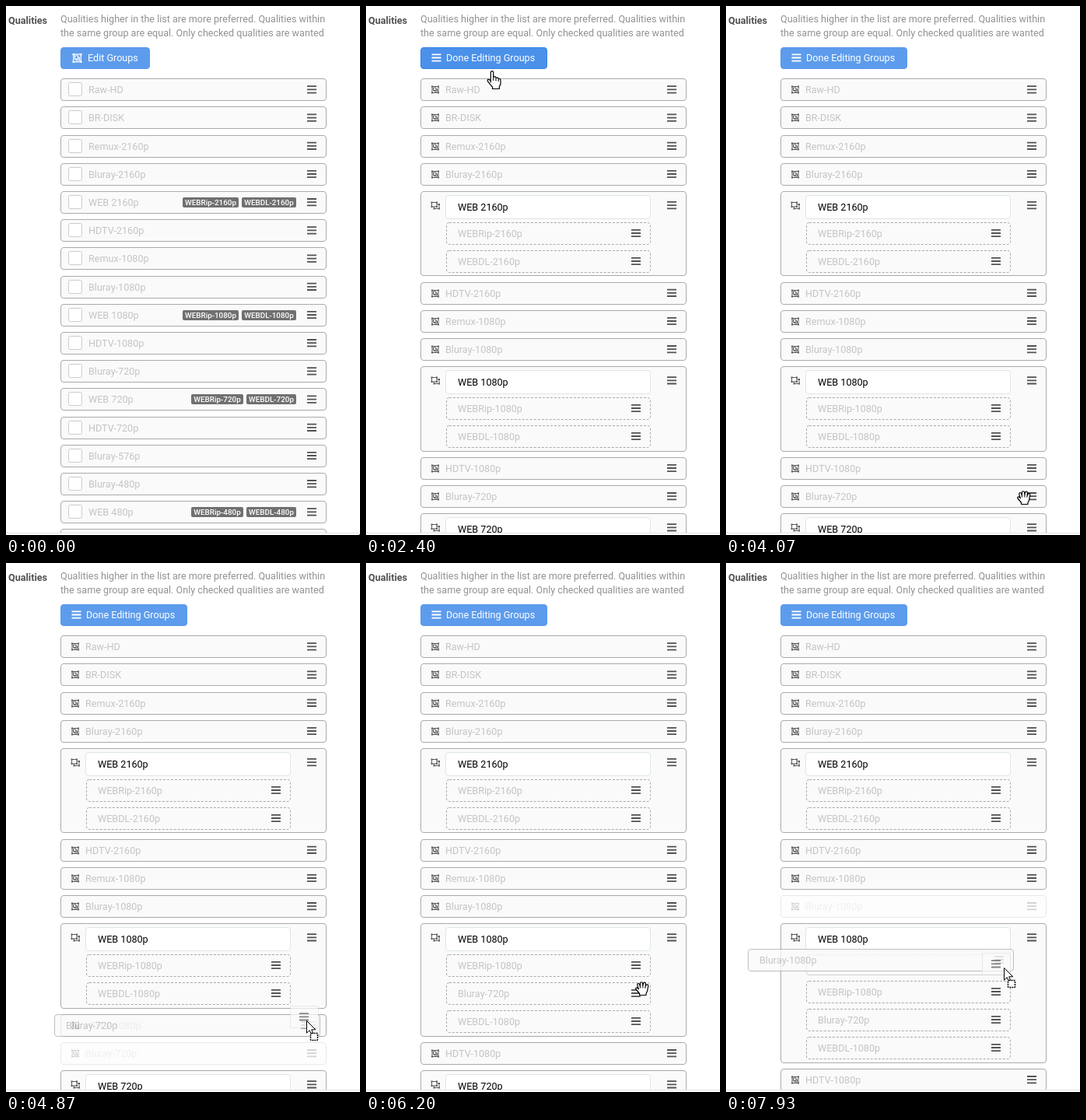
An HTML page for the animation above (8000 ms loop, 455 by 680 pixels).

```html
<!DOCTYPE html>
<html lang="en">
<head>
<meta charset="utf-8">
<title>Edit quality groups</title>
<style>
html, body { margin: 0; width: 100%; height: 100%; overflow: hidden; background: #fff; }
svg { display: block; width: 455px; height: 680px; font: 12.6px Roboto, sans-serif; }
.head { font-weight: 700; fill: #515253; }
.help { fill: #909293; }
.row { fill: #fafafa; stroke: #aaa; }
.name { fill: #c4c4c4; }
.held { fill: #b4b4b4; }
.sub { fill: #fafafa; stroke: #aaa; stroke-dasharray: 3 2; }
.slot { fill: none; stroke: #aaa; stroke-dasharray: 1 1; }
.input { fill: #fff; stroke: #dde6e9; }
.check { fill: #fff; stroke: #ccc; }
.tag { fill: #707070; }
.tagtext { font-size: 9.9px; font-weight: 500; fill: #fff; text-anchor: middle; }
.icon { fill: none; stroke: #5a5b5c; }
.button { fill: #5d9cec; stroke: #5899eb; }
.hot { fill: #4b91ea; stroke: #3483e7; }
.caption { fill: #fff; }
.piece { fill: #fafafa; stroke: #ccc; stroke-opacity: .5; }
.pen { fill: #fff; stroke: #000; stroke-width: 1.2; stroke-linejoin: round; }
.crease { fill: none; stroke: #000; }
</style>
</head>
<body>
<svg id="stage" viewBox="0 0 455 680"></svg>
<script>
const LOOP = 8000, STEP = 200 / 3;
const ENTER = 730, EDIT = 1730, DRAG1 = 4730, OPEN1 = 5130, DROP = 6200, DRAG2 = 7400, OPEN2 = 7930;
const TOP = 93.62, PITCH = 36.2, SLOT = 34;
const stage = document.getElementById('stage');

const names = ['Raw-HD', 'BR-DISK', 'Remux-2160p', 'Bluray-2160p', 'WEB 2160p', 'HDTV-2160p',
  'Remux-1080p', 'Bluray-1080p', 'WEB 1080p', 'HDTV-1080p', 'Bluray-720p', 'WEB 720p',
  'HDTV-720p', 'Bluray-576p', 'Bluray-480p', 'WEB 480p', 'SDTV'];

// Pointer moves: begin, end, then the point reached
const moves = [
  [ENTER, 1130, 157, 76],
  [2330, 2400, 162, 84],
  [2400, 3200, 346, 579],
  [3200, 3730, 356, 654],
  [3730, 4070, 387, 636],
  [4130, 4400, 396, 636],
  [4660, 4870, 386, 588],
  [4870, 5330, 359, 545],
  [5600, 5730, 359, 551],
  [6400, 6930, 403, 446],
  [DRAG2, 7960, 357, 521]
];

const smooth = k => k * k * (3 - 2 * k);

function pos(t) {
  let x = 328, y = 303;
  for (const [a, b, tx, ty] of moves) {
    const k = smooth(Math.min(1, Math.max(0, (t - a) / (b - a))));
    x += (tx - x) * k;
    y += (ty - y) * k;
  }
  return [x, y];
}

const dragging = t => t >= DRAG2 ? 'Bluray-1080p' : t >= DRAG1 && t < DROP ? 'Bluray-720p' : '';
const overButton = t => pos(t)[1] < 85;

function overHandle(t) {
  const [x, y] = pos(t);
  return x > 374 || x > 329 && x < 366 && y > 503 && y < 568;
}

const text = (x, y, s, c) => `<text x="${x}" y="${y}" class="${c}">${s}</text>`;
const box = (x, y, w, h, c, r = 3.5) =>
  `<rect x="${x + .5}" y="${y + .5}" width="${w}" height="${h}" rx="${r}" class="${c}"/>`;
const group = (s, attrs) => `<g ${attrs}>${s}</g>`;
const at = (x, y, s, c = '') => group(s, `transform="translate(${x} ${y})" class="${c}"`);

function bars(x, y, color = '#515253') {
  const line = dy => `M${x - 6} ${y + dy}h12`;
  return `<path d="${line(-4.2)}${line(0)}${line(4.2)}" stroke="${color}" stroke-width="1.8"/>`;
}

const joined = '<path d="M-4-4H4V4H-4ZM-2.5-2.5H1V1H-2.5ZM1-.5H2.5V2.5H-1V1"/>' +
  '<path d="M-5-4h2M3-4h2M-5 4h2M3 4h2" stroke-width="2"/>';
const split = '<path d="M-4.5-4H2V1.5H-4.5ZM2-1.5H5V4H-1.5V1.5"/>' +
  '<path d="M-5.5-4h2M1-4h2M-5.5 1.5h2M1 1.5h2M4-1.5h2M4 4h2M-2.5 4h2" stroke-width="2"/>';

function tags(y, res) {
  const long = res.length > 4;
  const tag = (right, w, s) => `<rect x="${right - w}" y="${y + 8}" width="${w}" height="13" rx="2" class="tag"/>` +
    text(right - w / 2, y + 18, s, 'tagtext');
  const w = long ? 70 : 64;
  return tag(369 - w, long ? 72 : 67, 'WEBRip-' + res) + tag(373, w, 'WEBDL-' + res);
}

function plainList() {
  return names.map((n, i) => {
    const top = TOP + PITCH * i, y = Math.floor(top);
    return box(70, y, 341, 28, 'row') + box(80, y + 5, 17, 17, 'check', 2) + text(106, y + 19, n, 'name') +
      (n.startsWith('WEB') ? tags(y, n.slice(4)) : '') + bars(393, top + 13.8);
  }).join('');
}

const editRow = (top, name) => {
  const y = Math.floor(top);
  return box(70, y, 341, 28, 'row') + at(89, y + 14.5, joined, 'icon') +
    text(102, y + 19, name, 'name') + bars(393, top + 13.8);
};

// A group with its name field; slot is the index of the drop gap, or -1.
function bundle(top, title, items, slot) {
  const y = Math.floor(top);
  const grow = (items.length - 2) * PITCH + (slot >= 0 ? SLOT : 0);
  let s = box(70, y, 341, Math.floor(top + 108.5 + grow) - y, 'row') +
    at(89, y + 18.5, split, 'icon') + bars(393, top + 17.7) +
    box(102, y + 5, 263, 30, 'input') + text(118, y + 25, title, 'title');
  let sy = y + 40;
  items.forEach((n, i) => {
    if (i === slot) {
      s += box(103, sy, 262, 26, 'slot');
      sy += SLOT;
    }
    s += box(103, sy, 262, 28, 'sub') + text(118, sy + 19, n, 'name') + bars(347, sy + 14);
    sy += 36;
  });
  return [s, 116.6 + grow];
}

function editList(t) {
  const moved = t >= DROP, held = dragging(t);
  let y = TOP, out = '';
  for (const n of names) {
    if (y > 677) break;
    if (moved && n === 'Bluray-720p') continue;
    if (n.startsWith('WEB')) {
      const res = n.slice(4), items = ['WEBRip-' + res, 'WEBDL-' + res];
      let slot = -1;
      if (res === '1080p') {
        if (moved) items.splice(1, 0, 'Bluray-720p');
        slot = t >= OPEN2 ? 0 : t >= OPEN1 && !moved ? 1 : -1;
      }
      const [s, h] = bundle(y, n, items, slot);
      out += s;
      y += h;
    } else {
      out += group(editRow(y, n), n === held ? 'opacity=".25"' : '');
      y += PITCH;
    }
  }
  return out;
}

function button(t) {
  const edit = t >= EDIT;
  return box(70, 53, edit ? 162 : 114, 27, overButton(t) ? 'button hot' : 'button') +
    (edit ? bars(90.5, 66.5, '#fff') + text(103, 71, 'Done Editing Groups', 'caption')
      : group(joined, 'transform="translate(91.5 67) scale(1.2)" fill="none" stroke="#fff"') +
        text(105, 71, 'Edit Groups', 'caption'));
}

// The row preview trails the handle by one step.
function ghost(t) {
  const name = dragging(t);
  if (!name) return '';
  const grip = t < DROP ? 3 : 10;
  const handle = time => {
    const [x, y] = pos(time);
    return [Math.round(x - grip), Math.round(y - 5)];
  };
  const [hx, hy] = handle(t), [gx, gy] = handle(t - STEP);
  const x = gx - 323, y = gy - 14;
  return group(box(x, y, 341, 28, 'row') + text(x + 15, y + 19, name, 'held') +
    bars(gx, gy, '#888'), 'opacity=".75"') +
    group(box(hx - 18, hy - 14, 36, 28, 'piece', 0) + bars(hx, hy + .3), 'opacity=".7"');
}

const arrow = '<path d="M.5 .5V16.2L4.2 12.7 6.8 18.6 9.2 17.5 6.7 11.8H11.8Z" fill="#fff" stroke="#000"/>';
const pointers = {
  arrow,
  drag: arrow + '<rect x="5.5" y="16.5" width="9" height="9" rx="1" fill="#fff" stroke="#000" stroke-width="1.5" stroke-dasharray="2 1"/>',
  point: `<path d="M-1.7 14V1.5Q-1.7-.3 0-.3T1.7 1.5V8Q2 0 1.7 7.2 4.6 6 5 8.4 8 7.3 8.2 9.6
    11 9 11 11.6V16Q10.5 18 9.3 19.5V22.5H.5V20Q-2 17.5-5.6 12.6C-6.5 10-4 9.5-1.7 12.4Z" class="pen"/>
    <path d="M1.7 8v4M5 9v3.5M8.2 10v3" class="crease"/>`,
  hand: at(-4, -4, `<path d="M-3.4 8.5V6.5L-8 1C-9-1-7-2-5.4-.2L-4.6 .8-6.2-4.2C-6.6-6.8-4.2-7.2-3.4-5.2L-2.6-3
    V-6.6C-2.4-8.8 .2-8.8 .6-6.6L.9-3.8 1.6-6.8C2.4-8.6 4.6-7.8 4.5-6L4.2-3 5.2-4.6C6.6-6 8.3-4.6 7.7-2.8
    L6.6 3.2 5 6.4V8.5Z" class="pen"/>
    <path d="M-2.6-3V-.5M.9-3.8V-.6M4.2-3L3.8-.2" class="crease"/>`)
};

function pointer(t) {
  if (t < 530) return '<path d="M454 679h1v1h-1z"/>';
  if (t < ENTER) return '';
  const kind = dragging(t) ? 'drag' : overButton(t) ? 'point' : overHandle(t) ? 'hand' : 'arrow';
  const [x, y] = pos(t);
  return at(Math.round(x), Math.round(y), pointers[kind]);
}

function render(t) {
  stage.innerHTML = '<rect width="455" height="680" fill="#fff"/>' +
    text(3, 23, 'Qualities', 'head') +
    text(70, 21, 'Qualities higher in the list are more preferred. Qualities within', 'help') +
    text(70, 39, 'the same group are equal. Only checked qualities are wanted', 'help') +
    button(t) + (t < EDIT ? plainList() : editList(t)) +
    '<rect y="677" width="455" height="3" fill="#fff"/><path d="M0 677.5H455" stroke="#e3e3e3"/>' +
    ghost(t) + pointer(t);
}

const start = performance.now();
let last = -1;
function tick() {
  const t = (performance.now() - start) % LOOP;
  const q = 10 * Math.round(Math.floor((t + 4) / STEP) * STEP / 10) % LOOP;
  if (q !== last) render(last = q);
  requestAnimationFrame(tick);
}
tick();
</script>
</body>
</html>
```
